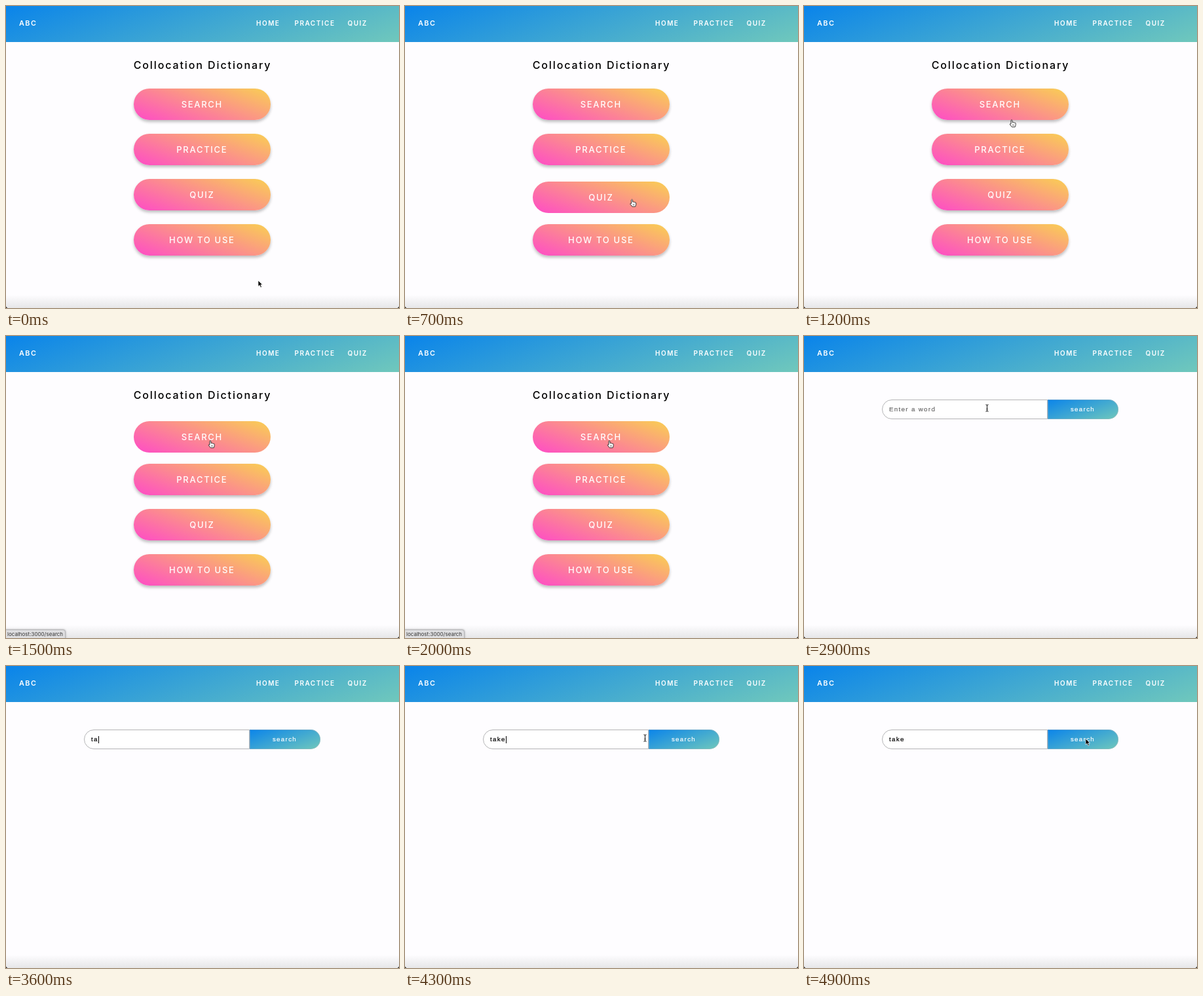
These frames come from a looping animation (600 px wide and 461 px high, 5 s). An HTML page:

```html
<!DOCTYPE html>
<html lang="en">
<head>
<meta charset="utf-8">
<title>Collocation Dictionary</title>
<style>
  html, body { margin: 0; width: 100%; height: 100%; overflow: hidden; background: #fefdff; }
  #stage { position: relative; width: 600px; height: 461px; overflow: hidden; background: #fefdff; }
  #stage * { box-sizing: border-box; }
  #stage div, #stage span, #stage svg { position: absolute; white-space: nowrap; }
  header { position: absolute; width: 600px; height: 54.5px; background: linear-gradient(160deg, #0a84ea, #70c8bc);
    color: #fff; font: 600 10px/14px Inter, sans-serif; letter-spacing: 1.5px; }
  header span { top: 19.4px; }
  header .brand { left: 20px; top: 20.3px; font-size: 10.8px; }
  .page { inset: 0; }
  h1 { position: absolute; margin: 0; left: 0; top: 80px; width: 600px; text-align: center; white-space: nowrap;
    color: #000; font: 500 16px/20px Inter, sans-serif; letter-spacing: 1.9px; }
  .button { left: 194.7px; width: 209.3px; height: 48px; border-radius: 24px; text-align: center; color: #fff;
    background: linear-gradient(20deg, #fe4bc7, #f9d052);
    font: 500 13px/48px Inter, sans-serif; letter-spacing: 1.7px; }
  .field, .go { top: 97.3px; height: 29.4px;
    font: 9.7px/28px "Liberation Sans", Arial, sans-serif; letter-spacing: 1.35px; -webkit-text-stroke: .2px; }
  .field { left: 119px; width: 253px; padding-left: 10px; border: 1px solid #b4b4b6;
    border-radius: 15px 0 0 15px; background: #fff; }
  .go { left: 371.5px; width: 108px; border-radius: 0 15px 15px 0; text-align: center; line-height: 30px;
    color: #fff; background: linear-gradient(160deg, #0a84ea, #70c8bc); box-shadow: inset 0 0 0 1px #b4b4b666; }
  #caret { top: 107px; width: 1px; height: 10.5px; background: #000; }
  #shade { left: 0; top: 441px; width: 600px; height: 20px; border-radius: 0 0 4px 4px;
    background: linear-gradient(#e6e6e800, #e6e6e8); box-shadow: 0 4px 0 #333; clip-path: inset(0); }
  .corner { top: 457px; width: 4px; height: 4px; }
  .corner.l { left: 0; background: radial-gradient(circle at 100% 0, #0000 4px, #333 4.5px); }
  .corner.r { right: 0; background: radial-gradient(circle at 0 0, #0000 4px, #333 4.5px); }
  #status { left: -1px; top: 448.3px; width: 92px; height: 14px; padding-left: 2px; border: 1px solid #b5b5b8;
    border-radius: 0 4px 0 0; background: #dedee0; box-shadow: 0 0 3px #0005; color: #333;
    font: 8px/13px Inter, sans-serif; }
  #cursor { left: 0; top: 0; width: 1px; height: 1px; overflow: visible; }
</style>
</head>
<body>
<div id="stage">
  <header>
    <span class="brand">ABC</span>
    <span style="left:382px">HOME</span>
    <span style="left:440.5px">PRACTICE</span>
    <span style="left:521.5px">QUIZ</span>
  </header>
  <div class="page" id="home">
    <h1>Collocation Dictionary</h1>
    <div class="button">SEARCH</div>
    <div class="button">PRACTICE</div>
    <div class="button">QUIZ</div>
    <div class="button">HOW TO USE</div>
  </div>
  <div class="page" id="search">
    <div class="field" id="field"></div>
    <div class="go">search</div>
    <div id="caret"></div>
  </div>
  <div id="shade"></div>
  <div class="corner l"></div>
  <div class="corner r"></div>
  <div id="status">localhost:3000/search</div>
  <svg id="cursor">
    <path id="arrow" d="M0 0V9.2L2.2 7.2L3.8 10.7L5.4 10L3.9 6.6H6.7Z" fill="#000" stroke="#fff" stroke-width=".7"/>
    <g id="hand" fill="#fff" stroke="#222" stroke-width=".9" stroke-linejoin="round">
      <path d="M-1 1Q0-.6 1 1V4.2Q2 3.4 2.8 4.4Q3.9 3.8 4.5 4.9Q6 4.3 6.2 5.8V8.2L5.2 11.2H.3L-2.7 7.2Q-2.6 5.6-1 6.6Z"/>
      <path d="M1.7 7.2V9.4M3.3 7.2V9.4" stroke-width=".6"/>
    </g>
    <path id="beam" d="M-2-5.2Q0-5.2 0-4Q0-5.2 2-5.2M0-4V4M-2 5.2Q0 5.2 0 4Q0 5.2 2 5.2M-1 1.5H1"
      fill="none" stroke="#111" stroke-width="1"/>
  </svg>
</div>
<script>
  const LOOP = 5000, STEP = 100;
  const $ = id => document.getElementById(id);
  const buttons = [...document.querySelectorAll('.button')];
  const within = (t, [from, to]) => t >= from && t < to;
  const clamp = v => Math.max(0, Math.min(1, v));
  // Rises after `on` and falls after `off`
  const pulse = (t, [on, off], rise, fall) => clamp((t - on) / rise) * (1 - clamp((t - off) / fall));

  const pageChange = 2200;
  const statusShown = [1350, 2400];
  const typingHidden = [3400, 4000];
  const hovers = [[1200, pageChange], [900, 1100], [550, 850], [350, 500]];

  // time, x, y of the pointer's hot spot
  const path = [
    [200, 385, 419], [500, 359, 318], [700, 346.5, 295],
    [1200, 317, 173.5], [1500, 312, 159.5], [2300, 312, 159.5],
    [2900, 279.5, 110], [4000, 279.5, 110], [4300, 366.5, 110],
    [4600, 410, 126], [4800, 430, 111]
  ];

  // time, typed text
  const typing = [[3400, 't'], [3600, 'ta'], [3700, 'tak'], [3900, 'take']];
  const caretEnds = { '': 130, t: 134, ta: 141, tak: 147, take: 153.5 };

  function pointerAt(t) {
    const next = path.findIndex(p => p[0] > t);
    if (next < 0) return path.at(-1).slice(1);
    if (next === 0) return path[0].slice(1);
    const [t0, x0, y0] = path[next - 1], [t1, x1, y1] = path[next];
    const k = (t - t0) / (t1 - t0);
    return [x0 + (x1 - x0) * k, y0 + (y1 - y0) * k];
  }

  function pointerKind(t, x, y) {
    if (t < pageChange) return hovers.some(h => within(t, h)) ? 'hand' : 'arrow';
    return y < 127 && x < 371 ? 'beam' : 'arrow';
  }

  const show = (el, on) => { el.style.visibility = on ? 'visible' : 'hidden'; };

  function draw(t) {
    show($('home'), t < pageChange);
    show($('search'), t >= pageChange);
    $('status').style.opacity = pulse(t, statusShown, 150, 300);

    buttons.forEach((el, i) => {
      const press = pulse(t, hovers[i], 100, 100);
      el.style.top = 126.3 + 69 * i + 3.2 * press + 'px';
      el.style.boxShadow = `0 3px 4px rgba(0,0,0,${0.25 * (1 - press)})`;
    });

    const text = typing.filter(k => k[0] <= t).at(-1)?.[1] ?? '';
    $('field').textContent = text || 'Enter a word';
    $('field').style.color = text ? '#000' : '#686868';
    $('caret').style.left = caretEnds[text] + 'px';
    show($('caret'), within(t, [3100, 4400]));

    const [x, y] = pointerAt(t), kind = pointerKind(t, x, y);
    for (const id of ['arrow', 'hand', 'beam']) $(id).style.display = id === kind ? '' : 'none';
    $('cursor').style.transform = `translate(${x}px, ${y}px)`;
    show($('cursor'), !within(t, typingHidden));
  }

  const start = performance.now();
  function tick() {
    const t = (performance.now() - start) % LOOP;
    draw(Math.floor(t / STEP) * STEP);
    requestAnimationFrame(tick);
  }
  tick();
</script>
</body>
</html>
```
